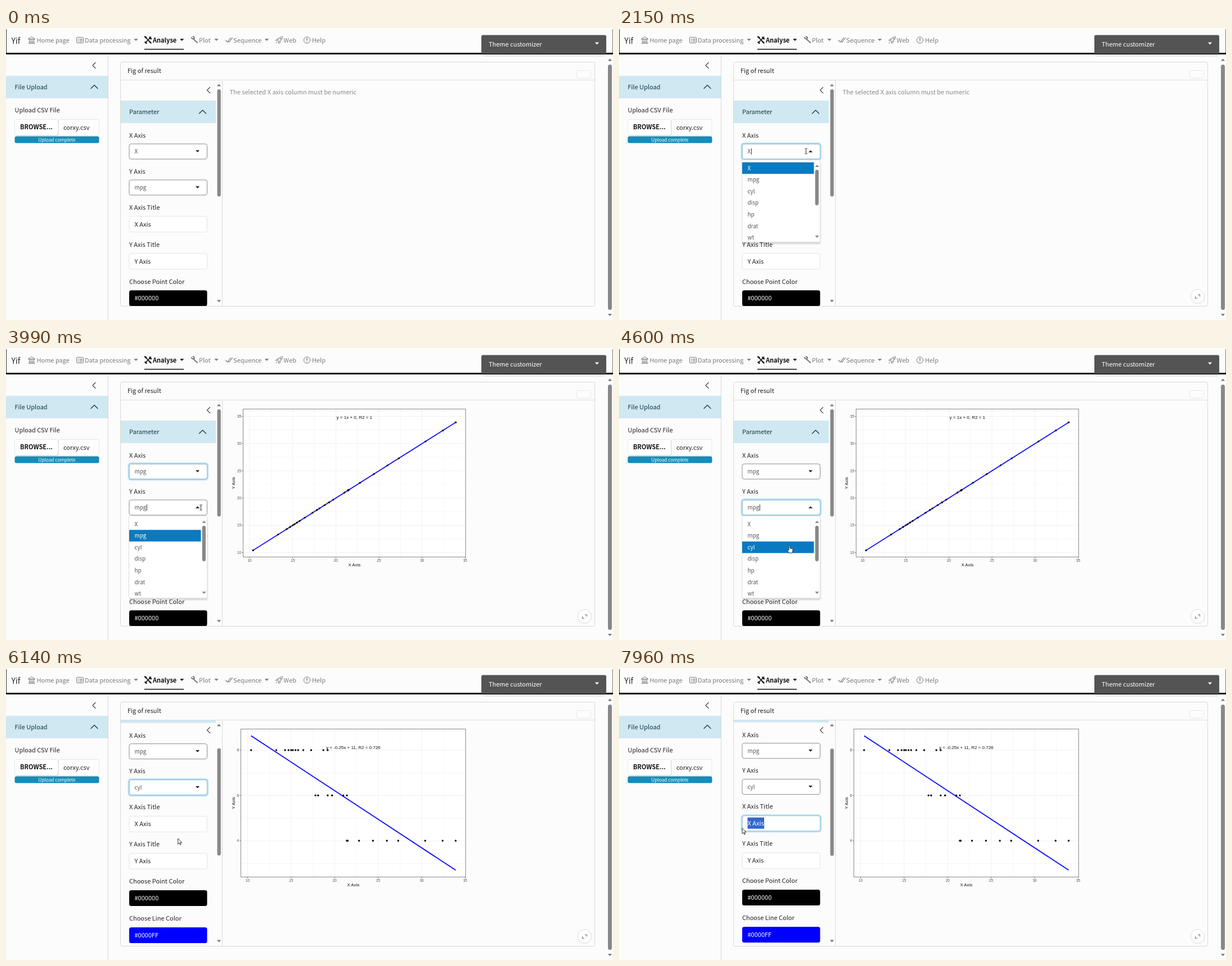
These frames come from a looping animation (1079x519 px, 8 s). An HTML page:

```html
<!DOCTYPE html>
<html lang="en">
<head>
<meta charset="utf-8">
<title>Regression panel</title>
<style>
html, body { margin: 0; width: 100%; height: 100%; overflow: hidden; background: #fcfcfc; }
svg { display: block; width: 100%; height: 100%; }
text { font: 11px "Noto Sans CJK SC", "Noto Sans CJK JP", "Noto Sans CJK", sans-serif; fill: #222; white-space: pre; }
.nav { fill: #7b7b7b; }
.bold { font-weight: 700; fill: #111; }
.small { font-size: 9.9px; fill: #555; }
.white { fill: #fff; }
.head { fill: #0d3544; }
.plot text { font: 7.8px "Liberation Sans", Arial, sans-serif; fill: #111; }
.plot .tick { font-size: 6.3px; fill: #4d4d4d; }
.mid { text-anchor: middle; }
.end { text-anchor: end; }
.icon { fill: none; stroke: #777; stroke-width: 1; stroke-linecap: round; stroke-linejoin: round; }
.chev { fill: none; stroke: #444; stroke-width: 1.2; stroke-linecap: round; stroke-linejoin: round; }
.line { fill: none; stroke: #d9d9d9; }
.cursor { stroke-linejoin: round; }
</style>
</head>
<body>
<svg id="stage" viewBox="0 0 1079 519" preserveAspectRatio="none"></svg>
<script>
const LOOP = 8000;

const text = (x, y, s, cls = "", extra = "") => `<text x="${x}" y="${y}" class="${cls}" ${extra}>${s}</text>`;
const rect = (x, y, w, h, fill, r = 0, extra = "") =>
  `<rect x="${x}" y="${y}" width="${w}" height="${h}" rx="${r}" fill="${fill}" ${extra}/>`;
const path = (d, cls, extra = "") => `<path d="${d}" class="${cls}" ${extra}/>`;
const group = (id, body, extra = "") => `<g id="${id}" ${extra}>${body}</g>`;
const caret = (x, y, fill = "#777", dir = 1) =>
  `<path d="M${x - 3.6} ${y - 1.9 * dir}h7.2l-3.6 ${3.8 * dir}z" fill="${fill}"/>`;
const chevUp = (x, y) => path(`M${x - 6} ${y + 3}l6 -6l6 6`, "chev", 'style="stroke:#0d3544"');
const chevLeft = (x, y) => path(`M${x + 2.5} ${y - 5}l-5 5l5 5`, "chev");

function navBar() {
  const icons =
    path("M39.5 19.5l6 -4l6 4zM40 27.5h11.5M41 25.5h9.5M41.5 20v5M44.2 20v5M46.9 20v5M49.6 20v5", "icon") +
    path("M126.5 16.5h10a1 1 0 0 1 1 1v8a1 1 0 0 1 -1 1h-10a1 1 0 0 1 -1 -1v-8a1 1 0 0 1 1 -1zM128 19.5h1M131 19.5h4.5M128 21.7h1M131 21.7h4.5M128 24h1M131 24h4.5", "icon") +
    path("M247.5 16l10 10.500M257.500 16l-10 10.500", "icon", 'style="stroke:#111;stroke-width:1.6"') +
    path("M247 15.500l2.500 2M254.500 23.500l3 3M255.500 16.500a2.500 2.500 0 0 0 2.500 2.500M247.500 25l2 2", "icon", 'style="stroke:#111;stroke-width:2.4"') +
    path("M333.500 20l6.500 6M329.800 17a3 3 0 0 0 5 1.500a3 3 0 0 0 -2.300 -3.300", "icon", 'style="stroke-width:2"') +
    path("M390.500 22l3 3l6 -7.500M395.500 24l1 1l6 -7.500", "icon", 'style="stroke-width:1.2"') +
    path("M483 22c1 -4 4 -6.500 8.500 -6.500c0 4.500 -2.500 7.500 -6.500 8.500zM484 19.500h-2.500l-1.800 2.700l3 .3M487.500 23v2.500l-2.700 2l-.3 -3M480 27l2 -2.200", "icon") +
    `<circle cx="488" cy="19" r="1" class="icon"/><circle cx="535" cy="21.500" r="5.700" class="icon"/>` +
    path("M535 18.300v3.700M535 24.500v.1", "icon", 'style="stroke-width:1.400"');
  const labels = [[54.5, "Home page"], [140, "Data processing"], [343, "Plot"], [404, "Sequence"], [493.5, "Web"], [544, "Help"]]
    .map(([x, s]) => text(x, 25.5, s, "nav")).join("");
  return text(9.5, 27.5, "Yif", "", 'style="font-size:13.9px"') + icons + labels +
    text(261, 25.5, "Analyse", "bold") +
    [231, 374, 463.5].map(x => caret(x, 21.2)).join("") + caret(312.7, 21.2, "#111") +
    rect(246, 37, 70, 1.5, "#111") + rect(0, 2, 1, 43, "#333") + rect(1078, 2, 1, 43, "#777") +
    rect(0, 44, 1079, 3, "#15151a") +
    rect(847, 44, 218, 7, "#000", 3, 'opacity=".07"') +
    `<path d="M845 45.500v-30a3 3 0 0 1 3 -3h216a3 3 0 0 1 3 3v30z" fill="#545454"/>` +
    text(858, 32.5, "Theme customizer", "white") + caret(1050.500, 27.500, "#fff");
}

function sideBar() {
  return rect(181, 47, 1, 472, "#d8d8d8") + chevLeft(156.5, 66.5) +
    rect(0, 85, 181, 40, "#d0e8f2") + text(15.5, 109, "File Upload", "head") + chevUp(157, 104.500) +
    text(15.5, 150, "Upload CSV File") +
    rect(93.5, 162.5, 71.500, 28.500, "#fdfdfd", 2, 'stroke="#e6e6e6"') +
    rect(16, 164, 77, 28, "#ddd", 3) + rect(15.500, 162.500, 77, 28, "#fff", 3, 'stroke="#e6e6e6"') +
    text(25, 180, "BROWSE...", "bold") + text(102, 181, "corxy.csv") +
    rect(15.5, 192.5, 150, 12, "#158cba", 3) +
    text(90.5, 201.500, "Upload complete", "white mid", 'style="font-size:8.3px"');
}

function card() {
  return rect(203.5, 60.5, 843, 434, "#fcfcfc", 3, 'stroke="#d9d9d9"') +
    rect(204, 92, 842, 1, "#dcdcdc") + rect(384, 92, 1, 402, "#d9d9d9") +
    text(216, 80, "Fig of result") + rect(1014.5, 75.500, 25, 13.500, "#fdfdfd", 2, 'stroke="#e6e6e6"');
}

function selectBox(id, y) {
  return rect(219, y, 138.500, 27, "#fff", 3.500, 'stroke="#8d8d8d"') +
    `<text id="${id}Value" x="228.500" y="${y + 17}" class="small"></text>` +
    group(id + "Closed", caret(340.500, y + 13.200, "#222")) +
    group(id + "Open", caret(340.500, y + 13.200, "#222", -1));
}

const field = (y, s) =>
  rect(219, y, 138.500, 28, "#fff", 3, 'stroke="#e4e4e4"') + text(228.500, y + 17.8, s);
const swatch = (y, color, s) => rect(219, y, 138.5, 28, color, 3.500) + text(228.500, y + 18, s, "white");

const OPTIONS = ["X", "mpg", "cyl", "disp", "hp", "drat", "wt"];
const ROW = 20.6;

function dropdown() {
  const items = OPTIONS.map((s, i) => text(228.500, 46.500 + ROW * i, s, "small option")).join("");
  return rect(221, 34, 139, 145, "#000", 4, 'opacity=".05"') + rect(219, 32, 138.500, 146, "#000", 3, 'opacity=".08"') +
    rect(218.500, 28.500, 139, 146, "#fff", 2, 'stroke="#ddd"') +
    `<g clip-path="url(#menuClip)"><rect id="hover" x="219" width="127.500" height="${ROW}" fill="#0a7ac0"/>${items}</g>` +
    caret(352, 39, "#888", -1) + rect(348.700, 46, 6.300, 63, "#888", 3) + caret(352, 165, "#888") +
    rect(249.800, 8, 0.9, 11, "#222", 0, 'id="caretBar"');
}

function panel() {
  const body = rect(204, 129, 169, 40, "#d0e8f2") + text(219, 153, "Parameter", "head") + chevUp(349.500, 149) +
    text(219, 195, "X Axis") + selectBox("x", 206) +
    text(219, 258.800, "Y Axis") + selectBox("y", 270) +
    text(219, 322.500, "X Axis Title") + field(334.700, "X Axis") +
    `<rect id="pick" y="338" height="20" fill="#3367d1"/>` +
    `<g clip-path="url(#pickClip)">${text(228.500, 352.500, "X Axis", "white")}</g>` +
    text(219, 388.500, "Y Axis Title") + field(400.700, "Y Axis") +
    text(219, 454.500, "Choose Point Color") + swatch(466.300, "#000", "#000000") +
    text(219, 520, "Choose Line Color") + swatch(532.300, "#00f", "#0000FF") +
    group("ring", rect(217.800, -1.200, 141, 29.500, "none", 4.500, 'stroke="#b9dff2" stroke-width="2.600"') +
      rect(219, 0, 138.500, 27, "none", 3.500, 'stroke="#8cc5e0"')) +
    group("menu", dropdown());
  return `<g clip-path="url(#panelClip)">${group("content", body)}</g>` + chevLeft(360, 110.500) +
    caret(378.500, 101.500, "#777", -1) + rect(375.500, 109, 6.300, 190.500, "#888", 3, 'id="thumb"') + caret(378.500, 485.500);
}

const pageScroll = () => caret(1073.500, 56.500, "#777", -1) + rect(1070, 65, 7, 436, "#888", 3.500) + caret(1073.500, 510);

const CYL = {
  8: [18.7, 14.3, 16.4, 17.3, 15.2, 10.4, 14.7, 15.5, 13.3, 19.2, 15.8, 15],
  6: [21, 21.4, 18.1, 19.2, 17.8, 19.7],
  4: [22.8, 24.4, 32.4, 30.4, 33.9, 21.5, 27.3, 26, 21.4]
};
const cars = Object.entries(CYL).flatMap(([cyl, list]) => list.map(mpg => ({ mpg, cyl: +cyl })));

function chart(id, o) {
  const X = v => o.x10 + (v - 10) * (816.3 - o.x10) / 25;
  const Y = v => o.y0 - (v - o.low) * o.unit;
  const right = 817, top = 108.5, bottom = 371.5;
  let s = rect(o.left, top, right - o.left, bottom - top, "#fff");
  const vLine = (v, w) => rect(X(v) - w / 2, top, w, bottom - top, "#efefef");
  const hLine = (v, w) => rect(o.left, Y(v) - w / 2, right - o.left, w, "#efefef");
  for (let v = 10; v <= 35; v += 5) {
    s += vLine(v, 0.9) + (v < 35 ? vLine(v + 2.5, 0.5) : "");
    s += rect(X(v) - 0.4, bottom, 0.8, 2.2, "#444") + text(X(v), 380, v, "tick mid");
  }
  for (const v of o.ticks) {
    s += hLine(v, 0.9) + hLine(v - o.half, 0.5);
    s += rect(o.left - 2.2, Y(v) - 0.4, 2.2, 0.8, "#444") + text(o.left - 3.5, Y(v) + 2.3, v, "tick end");
  }
  s += `<path d="M${X(10.4)} ${Y(o.fit(10.4))}L${X(33.9)} ${Y(o.fit(33.9))}" stroke="#00f" stroke-width="1.7"/>`;
  s += cars.map(c => `<circle cx="${X(c.mpg)}" cy="${Y(c[o.key])}" r="1.65"/>`).join("");
  s += rect(o.left, top, right - o.left, bottom - top, "none", 0, 'stroke="#7d7d7d" stroke-width=".9"');
  const mid = (o.left + right) / 2;
  s += text(mid, o.eqY, o.eq, "mid", 'style="font-size:8px"') + text(mid, 388.3, "X Axis", "mid") +
    text(0, 0, "Y Axis", "mid", 'transform="translate(407 240) rotate(-90)"');
  return group(id, s, 'class="plot"');
}

const charts = () =>
  chart("plotMpg", { key: "mpg", left: 421.5, x10: 433, low: 10, y0: 363.5, unit: 9.68, ticks: [10, 15, 20, 25, 30, 35], half: -2.5 * 0 || 2.5 * -1,
    fit: v => v, eq: "y = 1x + 0, R2 = 1", eqY: 126 }).replace(/<rect[^>]*y="9\d\.[^>]*>/g, "") +
  chart("plotCyl", { key: "cyl", left: 417.5, x10: 429.5, low: 4, y0: 307, unit: 40.25, ticks: [4, 6, 8], half: 1,
    fit: v => 11.26 - 0.2525 * v, eq: "y = -0.25x + 11, R2 = 0.726", eqY: 144 });

const expandButton = () => group("expand",
  `<circle cx="1028.500" cy="477.500" r="13" fill="#000" opacity=".05"/>` +
  `<circle cx="1028.500" cy="477" r="12.300" fill="#fdfdfd" stroke="#e0e0e0"/>` +
  path("M1029.500 474h3v3M1027.500 480.500h-3v-3", "icon", 'style="stroke:#666"'));

const cursors = () =>
  group("arrow", `<path d="M0 0v10l2.300 -2.100l1.600 3.600l1.500 -.700l-1.600 -3.400h3z" fill="#fff" stroke="#222" stroke-width=".9"/>`, 'class="cursor"') +
  group("beam", `<path d="M-2.200 -4.700h1.500l.7 .6l.7 -.6h1.500M0 -4v8M-2.200 4.700h1.500l.7 -.6l.7 .6h1.500" fill="none" stroke="#111" stroke-width=".9"/>`, 'class="cursor"') +
  group("hand", `<path d="M-1 8.500v-7.500a1 1 0 0 1 2 0v4l4 .800q1.200 .300 1.100 1.600l-.600 3.600l-1 2.200h-5l-3 -4.200q-.700 -1.300 .500 -1.400z" fill="#fff" stroke="#222" stroke-width=".9"/>`, 'class="cursor"');

const clip = (id, x, y, w, h, extra = "") =>
  `<clipPath id="${id}">${rect(x, y, w, h, "#000", 0, extra)}</clipPath>`;

document.getElementById("stage").innerHTML =
  `<defs>${clip("panelClip", 204, 93, 170, 401)}${clip("menuClip", 219, 29, 128, 145)}${clip("pickClip", 0, 338, 0, 20, 'id="pickMask"')}</defs>` +
  rect(0, 0, 1079, 519, "#fcfcfc") + navBar() + sideBar() + card() + panel() + pageScroll() +
  text(397.5, 117.5, "The selected X axis column must be numeric", "", 'id="message" style="fill:#888"') +
  charts() + expandButton() + cursors();

const $ = id => document.getElementById(id);
const show = (id, on) => $(id).setAttribute("visibility", on ? "visible" : "hidden");
const set = (id, attrs) => Object.entries(attrs).forEach(([k, v]) => $(id).setAttribute(k, v));
const shift = (id, x, y) => set(id, { transform: `translate(${x} ${y})` });

// Time, x, y of the pointer's hot spot
const MOVES = [
  [260, 700, 1], [520, 628, 72], [1020, 470, 150], [1070, 469, 151], [1300, 447, 162.300], [1820, 332.500, 219],
  [2150, 332.500, 219], [2700, 287, 272.500], [3100, 287, 272.500], [3620, 346.500, 283.500], [4040, 346.500, 283.500],
  [4600, 303, 351], [4900, 303, 351], [5490, 306, 303], [5860, 305.700, 303], [6480, 305.700, 303],
  [6750, 294.500, 277.500], [6960, 294.500, 277.500], [7090, 272.500, 277.500], [7230, 271.500, 278],
  [7360, 271.500, 278], [7530, 220.500, 285], [7920, 219, 284.500], [8000, 219, 284.500]
];
const SHAPES = [[0, ""], [260, "arrow"], [1720, "hand"], [1960, "beam"], [2330, "hand"], [3800, "beam"], [4210, "hand"],
  [4830, "beam"], [5180, "arrow"], [6610, "beam"], [7940, "arrow"]];
const SCROLL = [[5960, 0], [6000, 14], [6050, 45], [6090, 64], [6140, 71.3], [6240, 72.3], [8000, 72.3]];
const FOCUS = [[0, null], [2150, 206], [4040, 270], [7370, 335]];

const stepAt = (table, t) => table.filter(row => row[0] <= t).pop();
const smooth = u => u * u * (3 - 2 * u);

function tween(table, t, ease) {
  const i = table.findIndex(row => row[0] > t);
  if (i === 0) return table[0].slice(1);
  const [a, b] = [table[i - 1], table[i]];
  const u = ease((t - a[0]) / (b[0] - a[0]));
  return a.slice(1).map((v, k) => v + (b[k + 1] - v) * u);
}

function draw(t) {
  const [x, y] = tween(MOVES, t, smooth);
  const shape = stepAt(SHAPES, t)[1];
  for (const id of ["arrow", "beam", "hand"]) {
    show(id, id === shape);
    shift(id, x, y);
  }

  const [scroll] = tween(SCROLL, t, u => u);
  shift("content", 0, -scroll);
  shift("thumb", 0, scroll * 0.475);

  const focus = stepAt(FOCUS, t)[1];
  show("ring", focus !== null);
  shift("ring", 0, focus || 0);

  const openX = t >= 1960 && t < 2960, openY = t >= 3800 && t < 4830;
  show("xOpen", openX);
  show("xClosed", !openX);
  show("yOpen", openY);
  show("yClosed", !openY);
  $("xValue").textContent = t < 2960 ? "X" : "mpg";
  $("yValue").textContent = t < 4830 ? "mpg" : "cyl";

  $("menu").style.display = openX || openY ? "" : "none";
  if (openX || openY) {
    const top = openX ? 206 : 270;
    const start = openX ? 0 : 1;
    const under = Math.floor((y - top - 32.700) / ROW);
    const active = Math.max(start, under);
    shift("menu", 0, top);
    set("hover", { y: 32.700 + ROW * active });
    set("caretBar", { x: openX ? 235 : 249.800 });
    document.querySelectorAll(".option").forEach((n, i) => n.style.fill = i === active ? "#fff" : "");
  }

  const left = t < 7370 ? 258 : Math.min(258, Math.max(228.500, x));
  for (const id of ["pick", "pickMask"]) set(id, { x: left, width: 258 - left });

  show("expand", t >= 520);
  show("message", t < 3350);
  show("plotMpg", t >= 3350 && t < 5200);
  show("plotCyl", t >= 5200);
}

const begin = performance.now();
function tick() {
  draw((performance.now() - begin) % LOOP);
  requestAnimationFrame(tick);
}
draw(0);
requestAnimationFrame(tick);
</script>
</body>
</html>
```
